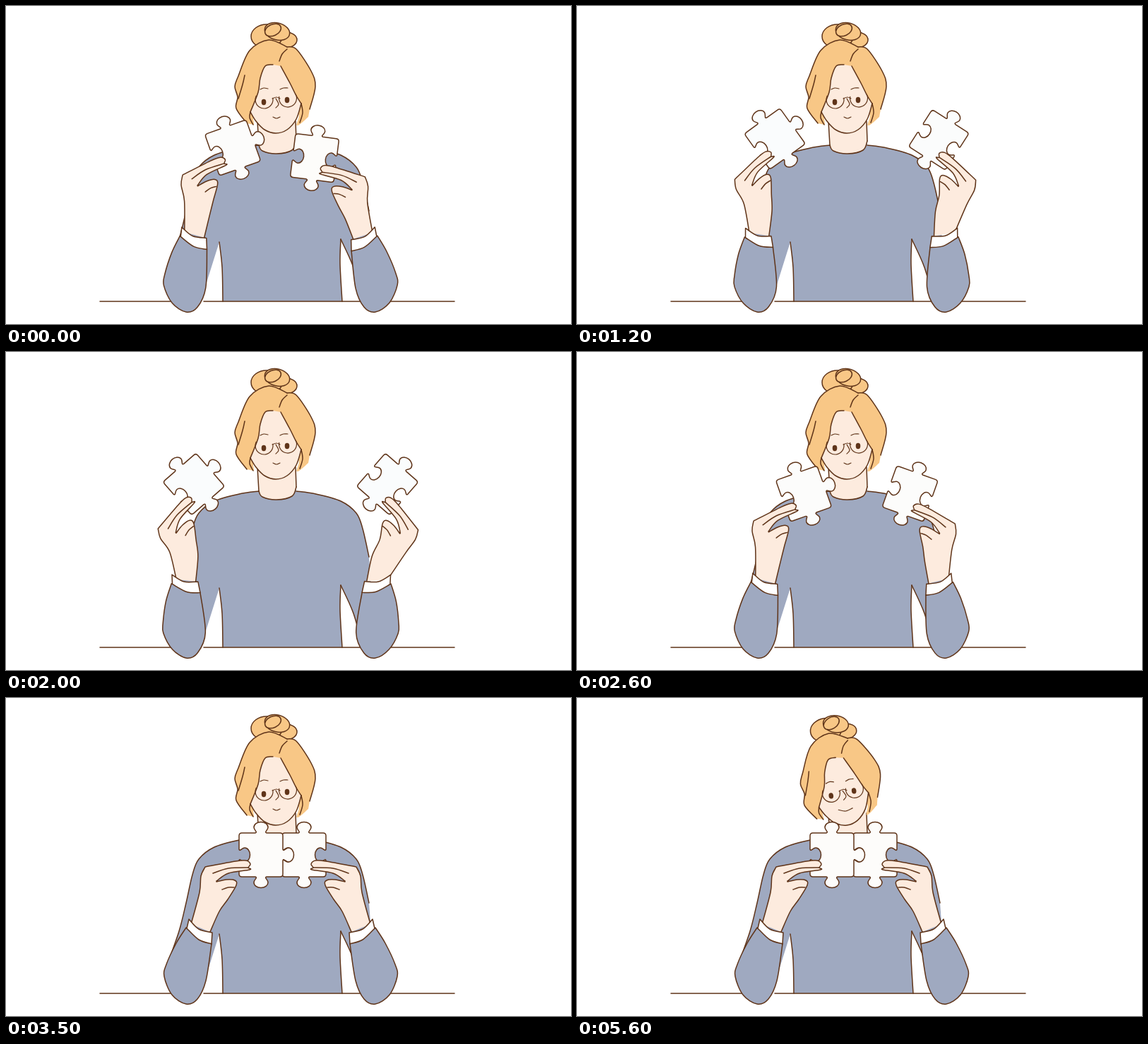
An HTML page with a canvas that plays this animation: 800x450 px, repeating every 5700 ms.

```html
<!DOCTYPE html>
<html lang="en">
<head>
<meta charset="utf-8">
<title>Joining two puzzle pieces</title>
<style>
  html, body { margin: 0; width: 100%; height: 100%; overflow: hidden; background: #fff; }
  canvas { display: block; }
</style>
</head>
<body>
<canvas id="stage" width="800" height="450"></canvas>
<script>
const ctx = document.getElementById('stage').getContext('2d');
const LOOP = 5700, STEP = 100;
const OPEN_END = 1870, JOIN_END = 3170, TILT_START = 3800, TILT_END = 4600;
const LINE = '#5f3419', HAIR = '#f8c786', SKIN = '#fdebde', BLUE = '#9fa9c0';
const BODY_MIRROR = 769, ARM_MIRROR = 778;
const LEFT_X = 361, RIGHT_X = 422, PIECE_Y = 222, ELBOW = [255, 405];

const rad = deg => deg * Math.PI / 180;
const clamp = n => Math.min(1, Math.max(0, n));
const mix = (a, b, u) => a + (b - a) * u;
function ease(t, from, to) {
  const u = clamp((t - from) / (to - from));
  return u * u * (3 - 2 * u);
}

const toPoints = flat => Array.from({ length: flat.length / 2 }, (_, i) => flat.slice(2 * i, 2 * i + 2));
const mirror = flat => flat.map((n, i) => i % 2 ? n : BODY_MIRROR - n);
const reversed = flat => toPoints(flat).reverse().flat();

// Smooth curves through points; separate segments meet at corners.
function trace(segments) {
  ctx.beginPath();
  segments.forEach((seg, k) => {
    const p = toPoints(seg);
    k ? ctx.lineTo(...p[0]) : ctx.moveTo(...p[0]);
    for (let i = 0; i < p.length - 1; i++) {
      const a = p[i - 1] || p[i], b = p[i], c = p[i + 1], d = p[i + 2] || c;
      ctx.bezierCurveTo(b[0] + (c[0] - a[0]) / 6, b[1] + (c[1] - a[1]) / 6,
        c[0] - (d[0] - b[0]) / 6, c[1] - (d[1] - b[1]) / 6, c[0], c[1]);
    }
  });
}
function fill(color, ...segments) { trace(segments); ctx.fillStyle = color; ctx.fill(); }
function stroke(...segments) { trace(segments); ctx.stroke(); }
function shape(color, ...segments) {
  fill(color, ...segments);
  ctx.closePath();
  ctx.stroke();
}
function oval(x, y, rx, ry, color, angle = 0) {
  ctx.beginPath();
  ctx.ellipse(x, y, rx, ry, rad(angle), 0, 2 * Math.PI);
  ctx.fillStyle = color;
  ctx.fill();
  if (color !== LINE) ctx.stroke();
}
function arc(x, y, r, from, to) {
  ctx.beginPath();
  ctx.arc(x, y, r, rad(from), rad(to));
  ctx.stroke();
}

function drawBody() {
  const side = [358, 197, 330, 201, 295, 211, 273, 228, 264, 250, 255, 290, 245, 330, 228, 378];
  const rightSide = reversed(mirror(side)).slice(4);
  const collar = [411, 191, 405, 204, 383, 209, 363, 205, 358, 197];
  const leftSeam = [302, 334, 306, 370, 307, 418];
  const rightSeam = [476, 418, 473, 365, 474, 330];
  const rightArm = [474, 330, 492, 370, 505, 418];
  fill(SKIN, [356, 160, 410, 160], collar);
  fill(BLUE, side, [250, 402, 280, 404], leftSeam, rightSeam, rightArm, [522, 400], rightSide, collar);
  for (const line of [side, rightSide, collar, leftSeam, rightSeam, rightArm]) stroke(line);
  stroke([356, 163, 357, 180, 358, 197]);
  stroke([410, 163, 411, 191]);
  for (const [from, to] of [[133, 235], [280, 505], [543, 635]]) stroke([from, 418, to, 418]);
}

function drawHead(tilt) {
  ctx.save();
  ctx.translate(382, 180);
  ctx.rotate(rad(-7 * tilt));
  ctx.translate(-382, -180);

  oval(396, 48, 16, 11, HAIR);
  oval(369, 43, 22, 17, HAIR);
  oval(384, 36, 18, 12, HAIR, 15);
  oval(378, 34, 12, 8, HAIR, -25);

  const left = [398, 58, 372, 48, 345, 63, 329, 99, 324, 114, 328, 129, 326, 145, 341, 166];
  const right = [398, 58, 411, 61, 432, 92, 438, 114, 430, 146];
  fill(HAIR, left, [351, 168, 356, 150, 411, 150, 412, 169, 428, 157], reversed(right));
  stroke(left);
  stroke(right);

  const fringe = [346, 150, 357, 122, 360, 102, 367, 85, 378, 83];
  const rightEdge = [389, 85, 402, 109, 411, 127, 418, 138];
  const jaw = [418, 138, 411, 160, 398, 175, 382, 180, 366, 175, 354, 163, 346, 150];
  fill(SKIN, fringe, rightEdge, jaw);
  for (const line of [fringe, rightEdge, jaw]) stroke(line);
  stroke([346, 150, 345, 158, 350, 168]);
  stroke([418, 138, 420, 151, 416, 165]);
  stroke([398, 61, 391, 68, 387, 78]);
  stroke([338, 98, 335, 111, 329, 131]);

  ctx.lineWidth = 1.2;
  arc(365.5, 132.5, 12.5, -10, 205);
  arc(399, 130.5, 12.5, -25, 190);
  stroke([377, 131, 383, 129, 388, 131]);
  stroke([382, 131, 386, 139, 382, 144]);
  stroke([360, 118, 365, 116, 371, 117]);
  stroke([388, 118, 393, 116, 399, 116]);
  const smile = mix(5, 10, tilt);
  stroke([383 - smile, 157, 383, 159 + tilt, 383 + smile, 157]);
  oval(365, 136, 3.3, 4.2, LINE);
  oval(398, 133, 3.3, 4.2, LINE);
  ctx.restore();
}

// Edges run top, right, bottom, left: 1 is a tab, -1 a socket.
function drawPiece({ x, y, angle, open }, edges) {
  const h = 31;
  ctx.save();
  ctx.translate(x, y);
  ctx.rotate(rad(angle));
  ctx.beginPath();
  for (const s of edges) {
    ctx.lineTo(-h, -27);
    ctx.quadraticCurveTo(-h, -h, -27, -h);
    ctx.lineTo(-8, -h);
    ctx.bezierCurveTo(-4, -h - s, -10, -h - 4 * s, -10, -h - 8 * s);
    ctx.ellipse(0, -h - 8 * s, 10, 7.5, 0, Math.PI, 0, s < 0);
    ctx.bezierCurveTo(10, -h - 4 * s, 4, -h - s, 8, -h);
    ctx.lineTo(27, -h);
    ctx.rotate(Math.PI / 2);
  }
  ctx.closePath();
  ctx.fillStyle = `rgb(${253 - 3 * open}, 252, ${250 + 3 * open})`;
  ctx.fill();
  ctx.stroke();
  ctx.restore();
}

function turn([x, y], [cx, cy], angle, [toX, toY] = [cx, cy]) {
  const c = Math.cos(rad(angle)), s = Math.sin(rad(angle));
  return [toX + (x - cx) * c - (y - cy) * s, toY + (x - cx) * s + (y - cy) * c];
}

// Left arm with the pieces joined; the right arm is its mirror image.
const HAND = [
  [262, 320, 274, 275, 276, 252, 282, 239],
  [282, 239, 325, 231, 340, 230, 346, 235, 343, 240, 345, 243, 315, 248, 298, 259],
  [298, 260, 312, 257, 324, 258, 326, 265, 314, 285, 302, 302, 289, 331]
];
const CREASES = [[293, 248, 315, 241, 343, 240], [306, 271, 315, 268, 323, 268]];
const CUFF = [[259, 313, 273, 327, 292, 332], [291, 348, 273, 342, 256, 326]];
const SLEEVE = [255, 325, 241, 347, 227, 377, 224, 394, 235, 420, 255, 433, 271, 426, 283, 400, 291, 348];

function drawArm({ grip, handAngle, armAngle }) {
  // The sleeve bends gradually above the resting elbow.
  const onArm = p => turn(p, ELBOW, armAngle * clamp((430 - p[1]) / 75));
  // The hand follows the piece, and its wrist blends into the cuff.
  const onHand = p => {
    const hand = turn(p, [LEFT_X, PIECE_Y], handAngle, grip), arm = onArm(p);
    const wrist = clamp((p[1] - 285) / 40);
    return hand.map((n, i) => mix(n, arm[i], wrist));
  };
  const pose = (seg, place) => toPoints(seg).flatMap(place);
  const outline = HAND.map(seg => pose(seg, onHand));
  fill(SKIN, ...outline);
  stroke(...outline);
  CREASES.forEach(seg => stroke(pose(seg, onHand)));
  shape(BLUE, pose(SLEEVE, onArm));
  shape('#fff', ...CUFF.map(seg => pose(seg, onArm)));
}

// Each piece swings outward from the joined position along an arc.
function swing(homeX, reach, startOpen, t) {
  const open = mix(startOpen, 1.03, ease(t, 0, OPEN_END)) * (1 - ease(t, OPEN_END, JOIN_END));
  return {
    open,
    x: homeX + reach * open,
    y: PIECE_Y - 35 * Math.sin(open * Math.PI / 2),
    angle: Math.sign(reach) * 41 * open ** 0.85
  };
}

function draw(t) {
  const left = swing(LEFT_X, -95, 0.42, t), right = swing(RIGHT_X, 118, 0.127, t);
  ctx.fillStyle = '#fff';
  ctx.fillRect(0, 0, 800, 450);
  ctx.strokeStyle = LINE;
  ctx.lineWidth = 1.5;
  ctx.lineCap = ctx.lineJoin = 'round';
  drawBody();
  drawHead(ease(t, TILT_START, TILT_END));
  drawPiece(right, [1, -1, 1, -1]);
  drawPiece(left, [1, 1, 1, -1]);
  drawArm({ grip: [left.x, left.y], handAngle: -39 * left.open, armAngle: -15 * left.open });
  ctx.save();
  ctx.translate(ARM_MIRROR, 0);
  ctx.scale(-1, 1);
  const gripX = LEFT_X + RIGHT_X - right.x;
  drawArm({ grip: [gripX, right.y], handAngle: -right.angle, armAngle: -16 * right.open });
  ctx.restore();
}

const start = performance.now();
function tick() {
  const t = (performance.now() - start) % LOOP;
  draw(Math.floor(t / STEP) * STEP);
  requestAnimationFrame(tick);
}
tick();
</script>
</body>
</html>
```
